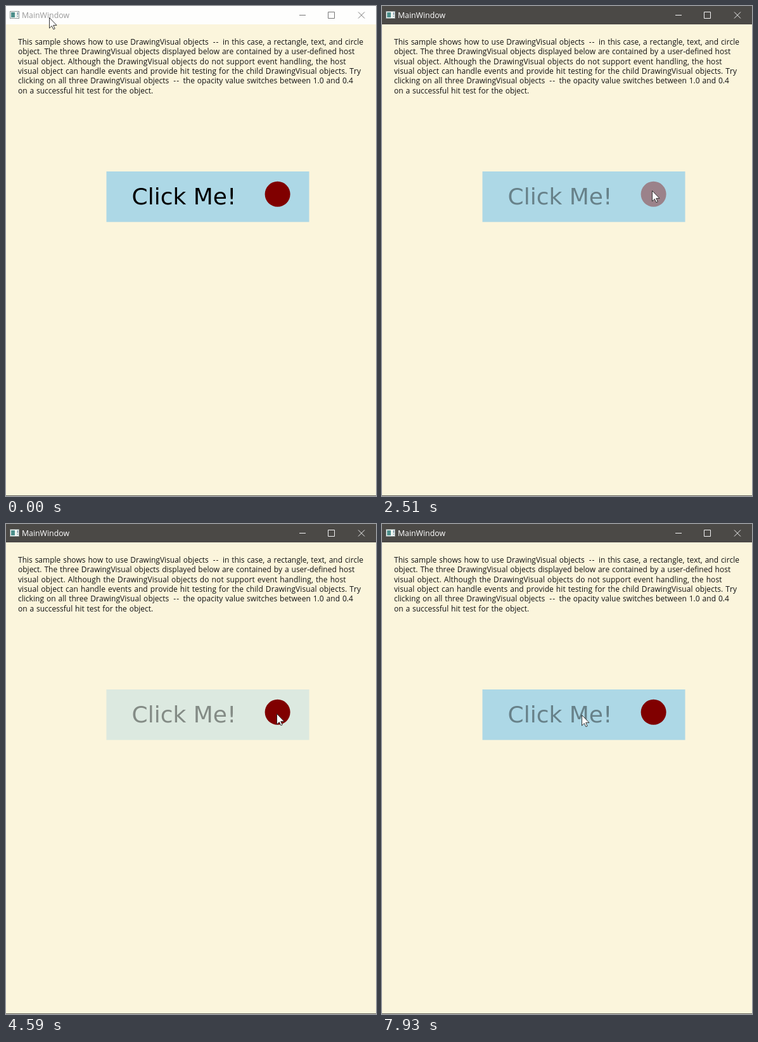
An HTML page that plays this animation: 584 px wide and 773 px high, repeating every 8000 ms.

```html
<!DOCTYPE html>
<html lang="en">
<head>
<meta charset="utf-8">
<title>MainWindow</title>
<style>
  html, body { margin: 0; width: 100%; height: 100%; overflow: hidden; background: #fbf5dc; }
  svg { display: block; width: 584px; height: 773px; font-kerning: none; }
  .ui { font-family: "Open Sans", "Noto Sans", sans-serif; }
  #bar { fill: #fefefd; }
  #caption { fill: #999; font-size: 12.3px; }
  #controls { fill: none; stroke: #777; }
  .active #bar { fill: #4b4946; }
  .active #caption { fill: #fff; }
  .active #controls { stroke: #f2f2f2; }
  #copy { font-size: 12px; word-spacing: .75px; fill: #111; }
  #label { font: 36px "DejaVu Sans", Verdana, sans-serif; }
  .dim { opacity: .4; }
</style>
</head>
<body>
<svg id="stage" viewBox="0 0 584 773">
  <rect width="584" height="773" fill="#fbf5dc"/>
  <rect id="bar" width="584" height="29"/>
  <g id="icon">
    <rect x="6.5" y="8.5" width="14" height="11" fill="#fff" stroke="#8a9694"/>
    <rect x="8" y="10" width="6" height="8" fill="#4d8f8b"/>
    <rect x="15" y="10" width="4" height="8" fill="#e6efe9"/>
    <path d="M18.5 10v4M18.5 15.5v1.5" stroke="#4a6a8c"/>
  </g>
  <text id="caption" class="ui" x="25" y="19">MainWindow</text>
  <path id="controls" d="M463 14.5h10M508.5 9.5h10v10h-10zM556 9.5l10 10M566 9.5l-10 10"/>
  <g id="copy" class="ui">
    <text x="19" y="61">This sample shows how to use DrawingVisual objects <tspan dx="3" letter-spacing="1">--</tspan><tspan dx="1.6"> in this case, a rectangle, text, and circle</tspan></text>
    <text x="19" y="76.3">object. The three DrawingVisual objects displayed below are contained by a user-defined host</text>
    <text x="19" y="91.6" letter-spacing=".11">visual object. Although the DrawingVisual objects do not support event handling, the host</text>
    <text x="19" y="106.9" letter-spacing=".08">visual object can handle events and provide hit testing for the child DrawingVisual objects. Try</text>
    <text x="19" y="122.2" letter-spacing=".03">clicking on all three DrawingVisual objects <tspan dx="3" letter-spacing="1">--</tspan><tspan dx="1.6"> the opacity value switches between 1.0 and 0.4</tspan></text>
    <text x="19" y="137.5">on a successful hit test for the object.</text>
  </g>
  <rect id="box" x="158.5" y="261" width="320" height="79.7" fill="#add8e6"/>
  <text id="label" x="198.5" y="313">Click Me!</text>
  <circle id="dot" cx="428.6" cy="296.8" r="20" fill="#800000"/>
  <path d="M0 772.5h584" stroke="#62605a"/>
  <path id="cursor" d="M.5 .5V17l3.8-3.6 2.6 5.4 2.3-1-2.5-5.4H12z" fill="#fff" stroke="#222" stroke-width=".9"/>
</svg>
<script>
  const LOOP = 8000, TICK = 1000 / 12;
  const $ = id => document.getElementById(id);

  // Pointer stops: tick, x, y
  const path = [
    [0, 68, 18], [10, 277, 315], [13, 279, 309], [16, 279, 309],
    [26, 423, 290], [30, 426, 291], [31, 426, 291], [39, 392, 323],
    [43, 392, 323], [48, 427, 299], [57, 427, 299], [63, 397, 322],
    [69, 397, 322], [74, 300, 303], [79, 300, 303], [80, 301, 304],
    [90, 301, 304], [91, 301, 306], [92, 301, 306], [95, 315, 301]
  ];

  // Ticks at which each visual is clicked
  const clicks = { label: [15, 80, 91], dot: [30, 55], box: [43, 68] };

  function pointer(tick) {
    const i = path.findIndex(p => p[0] > tick);
    if (i < 0) return path[path.length - 1].slice(1);
    const [t0, x0, y0] = path[i - 1], [t1, x1, y1] = path[i];
    const u = (tick - t0) / (t1 - t0), e = u * u * (3 - 2 * u);
    return [x0 + (x1 - x0) * e, y0 + (y1 - y0) * e].map(Math.round);
  }

  function draw(now) {
    const tick = Math.floor((now % LOOP + 1) / TICK);
    $('stage').classList.toggle('active', tick >= 1);
    for (const id in clicks) {
      const count = clicks[id].filter(t => t <= tick).length;
      $(id).classList.toggle('dim', count % 2 === 1);
    }
    $('cursor').setAttribute('transform', `translate(${pointer(tick)})`);
  }

  let start;
  function loop(now) {
    start ??= now;
    draw(now - start);
    requestAnimationFrame(loop);
  }
  draw(0);
  requestAnimationFrame(loop);
</script>
</body>
</html>
```
